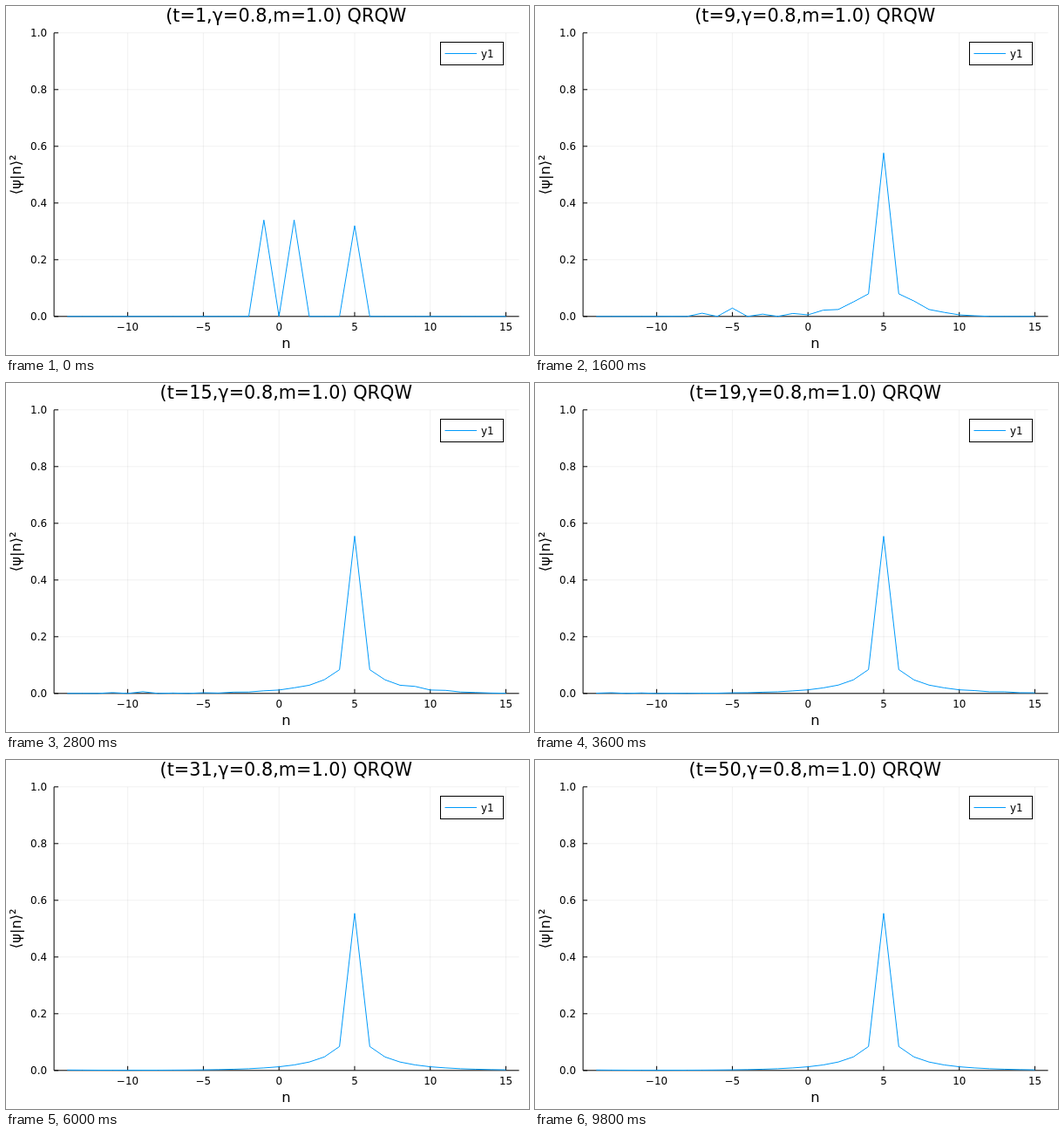
An HTML page that plays this animation: 600 px wide and 400 px high, repeating every 10 s.

```html
<!DOCTYPE html>
<html lang="en">
<head>
<meta charset="utf-8">
<title>Walk with resets</title>
<style>
  html, body { margin: 0; width: 100%; height: 100%; overflow: hidden; background: #fff; }
  svg { display: block; width: 600px; height: 400px; }
  text { font: 11.9px "DejaVu Sans", sans-serif; fill: #000; }
  .title { font-size: 20.8px; }
  .label { font-size: 16.3px; }
  .mid { text-anchor: middle; }
  .end { text-anchor: end; }
  path, rect { fill: none; stroke: #000; }
  .grid { stroke-opacity: .1; stroke-width: .6; }
  .curve { stroke: #009afa; stroke-linejoin: round; }
</style>
</head>
<body>
<svg viewBox="0 0 600 400">
  <path class="grid" id="grid"/>
  <path id="axes"/>
  <path class="curve" id="curve"/>
  <rect x="498.5" y="41.5" width="72" height="26" style="fill:#fff"/>
  <path class="curve" d="M503.5 54.5H540"/>
  <text x="545" y="59">y1</text>
  <text class="title mid" id="title" x="321.3" y="18.3"></text>
  <text class="label mid" x="321.5" y="392">n</text>
  <text class="label mid" transform="translate(16.5 193.3) rotate(-90)">⟨ψ|n⟩²</text>
</svg>
<script>
const STEPS = 50, STEP_MS = 200;
const SITES = 30, FIRST = -14, HOME = 5;
const STAY = 0.8, SWITCH = 1 - STAY;
const LEFT = 55.1, RIGHT = 588.6, TOP = 30.8, BOTTOM = 355.8;

const el = id => document.getElementById(id);
const px = n => 313.2 + 17.355 * n;
const py = p => BOTTOM - (BOTTOM - TOP) * p;
const ring = n => ((n % SITES) + SITES) % SITES;

function addText(x, y, content, cls) {
  const node = document.createElementNS("http://www.w3.org/2000/svg", "text");
  node.setAttribute("x", x);
  node.setAttribute("y", y);
  node.setAttribute("class", cls);
  node.textContent = content;
  document.querySelector("svg").append(node);
}

function drawFrame() {
  let grid = "", axes = `M${LEFT} ${TOP}V${BOTTOM}H${RIGHT}`;
  for (let n = -10; n <= 15; n += 5) {
    grid += `M${px(n)} ${TOP}V${BOTTOM}`;
    axes += `M${px(n)} ${BOTTOM}v-5`;
    addText(px(n), 371.5, String(n).replace("-", "−"), "mid");
  }
  for (let i = 0; i <= 5; i++) {
    const y = py(i / 5);
    grid += `M${LEFT} ${y}H${RIGHT}`;
    axes += `M${LEFT} ${y}h5`;
    addText(47, y + 4.4, (i / 5).toFixed(1), "end");
  }
  el("grid").setAttribute("d", grid);
  el("axes").setAttribute("d", axes);
}

// Hadamard walk on a ring, symmetrised about its starting site.
function walkTable() {
  let right = Array(SITES).fill(0), left = Array(SITES).fill(0);
  right[0] = 1;
  const table = [];
  for (let k = 0; k <= STEPS; k++) {
    const p = right.map((r, i) => r * r + left[i] * left[i]);
    table.push(p.map((v, i) => (v + p[ring(-i)]) / 2));
    const r = right, l = left;
    right = r.map((_, i) => (r[ring(i - 1)] + l[ring(i - 1)]) * Math.SQRT1_2);
    left = r.map((_, i) => (r[ring(i + 1)] - l[ring(i + 1)]) * Math.SQRT1_2);
  }
  return table;
}

const walk = walkTable();
const held = t => 0.5 - 0.3 * (STAY - SWITCH) ** t;

// Never reset + held at home + released from home k steps ago.
function probability(n, t) {
  let p = (1 - held(1)) * STAY ** (t - 1) * walk[t][ring(n)];
  if (n === HOME) p += held(t);
  for (let k = 1; k < t; k++)
    p += held(t - k) * SWITCH * STAY ** (k - 1) * walk[k][ring(n - HOME)];
  return p;
}

const curves = Array.from({ length: STEPS }, (_, s) =>
  "M" + Array.from({ length: SITES }, (_, i) => {
    const n = FIRST + i;
    return px(n).toFixed(2) + " " + py(probability(n, s + 1)).toFixed(2);
  }).join("L"));

let shown = -1;
function render(now) {
  const s = Math.floor(now / STEP_MS) % STEPS;
  if (s !== shown) {
    shown = s;
    el("curve").setAttribute("d", curves[s]);
    el("title").textContent = `(t=${s + 1},γ=0.8,m=1.0) QRQW`;
  }
}

drawFrame();
const start = performance.now();
render(0);
requestAnimationFrame(function tick() {
  render(performance.now() - start);
  requestAnimationFrame(tick);
});
</script>
</body>
</html>
```
